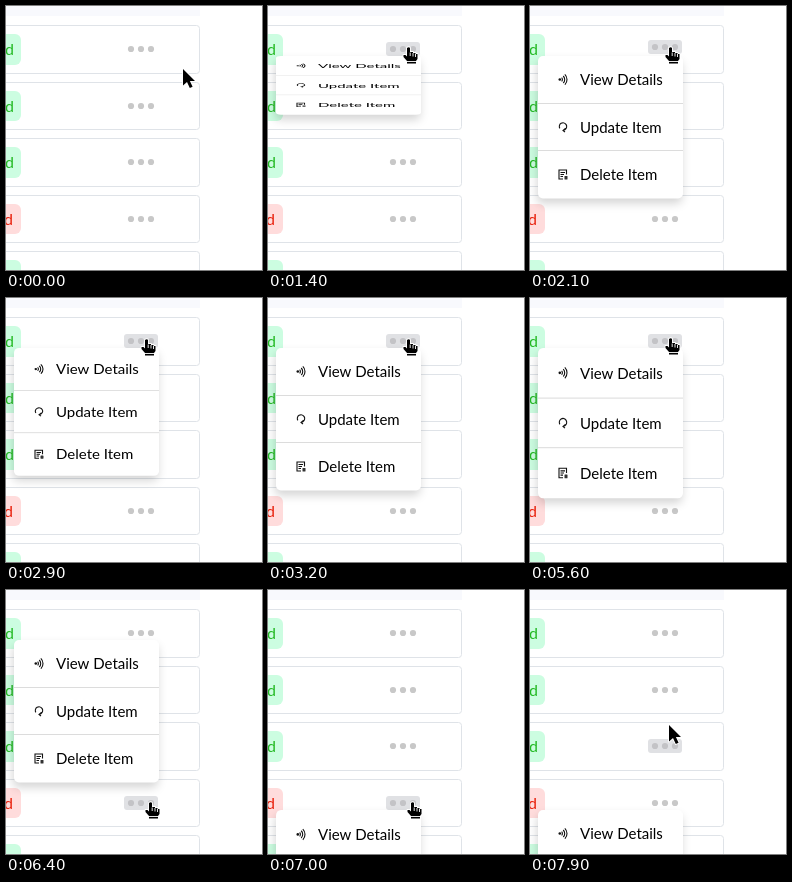
An HTML page with a canvas for the animation above (8000 ms loop, 256 by 264 pixels).

```html
<!DOCTYPE html>
<html lang="en">
<head>
<meta charset="utf-8">
<title>Row actions menu</title>
<style>
  html, body { margin: 0; height: 100%; overflow: hidden; background: #fff; }
  canvas { display: block; }
</style>
</head>
<body>
<canvas id="stage" width="256" height="264"></canvas>
<script>
const ctx = document.getElementById('stage').getContext('2d');
const LOOP = 8000, STEP = 100, PITCH = 56.5;
const rowTop = i => Math.floor(19.5 + PITCH * i);
const rowBottom = i => Math.floor(67 + PITCH * i);
const dotY = i => rowTop(i) + 24;

const home = { x: 177, y: 63 };
const moves = [
  { start: 400, end: 900, x: 141, y: 42 },
  { start: 3300, end: 3900, x: 217, y: 70 },
  { start: 4550, end: 5000, x: 141, y: 41 },
  { start: 5800, end: 6100, x: 151, y: 213, bow: 14 },
  { start: 6100, end: 6400, x: 145, y: 213 },
  { start: 7700, end: 7900, x: 139, y: 135 }
];
const menus = [
  { open: 1300, close: 2300, row: 0 },
  { open: 2700, close: 4200, row: 0 },
  { open: 5300, close: 6600, row: 0 },
  { open: 6600, close: LOOP, row: 3 }
];

const easeOut = u => u * (2 - u);

function backOut(u) {
  const c = 1.3, v = Math.min(u, 1) - 1;
  return 1 + (c + 1) * v ** 3 + c * v * v;
}

function pointerAt(t) {
  let { x, y } = home;
  for (const m of moves) {
    const u = easeOut(Math.min(1, Math.max(0, (t - m.start) / (m.end - m.start))));
    x += (m.x - x) * u + (m.bow || 0) * Math.sin(Math.PI * u);
    y += (m.y - y) * u;
  }
  return { x, y };
}

function overButton(p, row) {
  return p.x >= 118 && p.x <= 152 && Math.abs(p.y - dotY(row)) <= 7;
}

function isPressed(t, row) {
  return menus.some(m => m.row === row &&
    (t >= m.open && t < m.open + 100 || t >= m.close - 200 && t < m.close));
}

function box(x, y, w, h, r, fill, stroke) {
  ctx.beginPath();
  ctx.roundRect(x, y, w, h, r);
  ctx.fillStyle = fill;
  ctx.fill();
  if (stroke) { ctx.strokeStyle = stroke; ctx.lineWidth = 1; ctx.stroke(); }
}

function disc(x, y, r, fill) {
  ctx.beginPath();
  ctx.arc(x, y, r, 0, 7);
  ctx.fillStyle = fill;
  ctx.fill();
}

function label(text, x, y, size, fill, align = 'left') {
  ctx.font = `${size}px Lato, sans-serif`;
  ctx.textAlign = align;
  ctx.fillStyle = fill;
  ctx.fillText(text, x, y);
}

function drawRow(i, hovered, pressed) {
  const top = rowTop(i), bottom = rowBottom(i), red = i === 3;
  box(-10, top + 0.5, 203.5, bottom - top, 3, '#fff', '#dfe3e8');
  box(-40, top + 9, 55, bottom - top - 17, 6, red ? '#ffdcdc' : '#ccfde1');
  label('d', red ? 7 : 8, top + 30, 16, red ? '#e81f0a' : '#22b922', 'right');
  const cy = dotY(i) - (pressed ? 2 : 0);
  if (hovered) box(118, cy - 7, 34, 14, 3, '#e0e1e4');
  for (const x of [125, 135, 145]) disc(x, cy, 3.1, hovered ? '#c3c3c6' : '#c8c8c8');
}

const icons = [
  () => { // signal waves
    disc(-3.2, 0, 1.3, '#111');
    for (let r = 2.6; r < 8; r += 2.3) {
      ctx.beginPath();
      ctx.arc(-3.2, 0, r, -0.8, 0.8);
      ctx.stroke();
    }
  },
  () => { // circular arrow
    ctx.beginPath();
    ctx.arc(0, -0.5, 3.7, 2.6, 7.7);
    ctx.moveTo(2.4, 1.4); ctx.lineTo(0, 3.4); ctx.lineTo(2, 5);
    ctx.stroke();
  },
  () => { // list with a bin
    ctx.stroke(new Path2D('M3.5 0V-4.5H-4V4.5H0M-2.5-2H2M-2.5 0H1M-2.5 2H0'));
    box(1.5, 1.5, 3, 3.5, 0.5, '#333');
  }
];

function drawMenu(row, scale) {
  ctx.save();
  ctx.translate(0, dotY(row) + 7);
  ctx.scale(1, scale);
  ctx.save();
  ctx.shadowColor = 'rgba(0,0,0,.17)';
  ctx.shadowBlur = 10;
  ctx.shadowOffsetX = -1;
  ctx.shadowOffsetY = 5;
  box(8, 0, 145, 142.5, 5, '#fff');
  ctx.restore();
  ctx.fillStyle = '#dcdcdc';
  ctx.fillRect(8, 47, 145, 1);
  ctx.fillRect(8, 94, 145, 1);
  ['View Details', 'Update Item', 'Delete Item'].forEach((text, i) => {
    const y = 23.5 + 47.5 * i;
    label(text, 50, Math.round(y + 5.6), 15, '#000');
    ctx.save();
    ctx.translate(33, y);
    ctx.strokeStyle = '#111';
    ctx.lineWidth = 1.1;
    icons[i]();
    ctx.restore();
  });
  ctx.restore();
}

const arrow = new Path2D('M0 0V16.5L4 13L6.8 19L9.6 17.7L6.9 12H12Z');
const hand = new Path2D('M-2 0Q0-1.5 1 0V4H4V5H6.5V6H8.5V11L7 13V15.5H-2V13L-5.5 9V7H-3.5L-2 8.5Z');
const handLines = new Path2D('M1.2 4.5V8M4 5V8.5M6.5 6V9M-2 13.5H7');

function drawPointer({ x, y }, isHand) {
  const shape = isHand ? hand : arrow;
  ctx.save();
  ctx.translate(x, y);
  ctx.lineJoin = 'round';
  ctx.strokeStyle = '#fff';
  ctx.lineWidth = 1.8;
  ctx.stroke(shape);
  ctx.fillStyle = '#000';
  ctx.fill(shape);
  ctx.lineWidth = 0.9;
  if (isHand) ctx.stroke(handLines);
  ctx.restore();
}

function draw(t) {
  const pointer = pointerAt(t), previous = pointerAt(t - STEP);
  let isHand = false;
  ctx.fillStyle = '#fff';
  ctx.fillRect(0, 0, 256, 264);
  ctx.fillStyle = '#f8f9fd';
  ctx.fillRect(0, 0, 194, 10);
  for (let i = 0; i < 5; i++) {
    const over = overButton(pointer, i);
    isHand ||= over;
    // The highlight lingers for one step after the pointer leaves
    drawRow(i, over || overButton(previous, i), over && isPressed(t, i));
  }
  for (const { open, close, row } of menus) {
    const age = t - open - 50;
    if (age >= 0 && t < close) drawMenu(row, backOut(age / 450));
  }
  drawPointer(pointer, isHand);
}

function tick() {
  const t = performance.now() % LOOP;
  draw(Math.floor(t / STEP) * STEP);
  requestAnimationFrame(tick);
}
tick();
</script>
</body>
</html>
```
